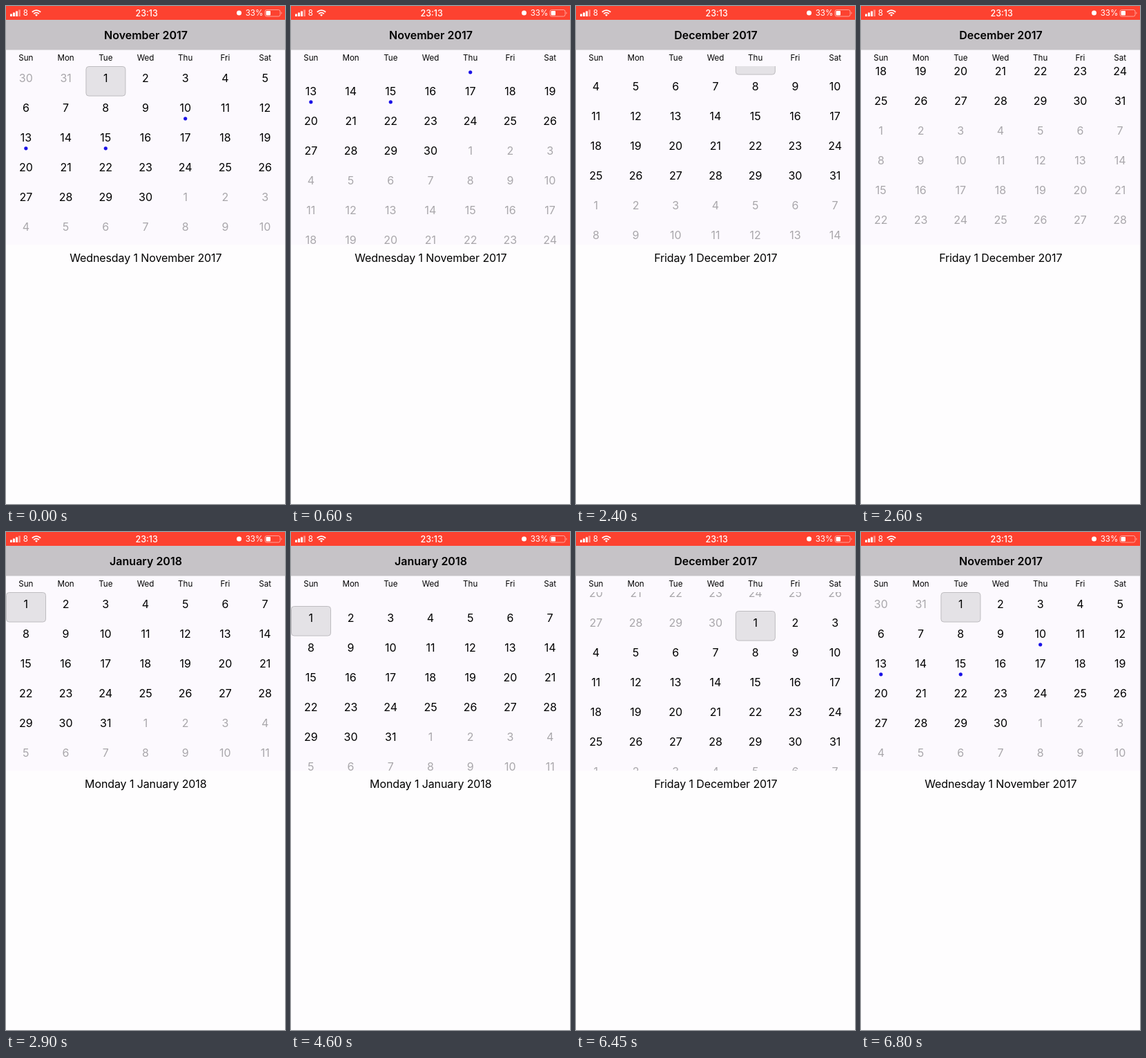
Write an HTML page that moves like this. It is 404x720 px and loops after 8000 ms.

```html
<!DOCTYPE html>
<html lang="en">
<head>
<meta charset="utf-8">
<title>Month calendar</title>
<style>
  html, body { margin: 0; height: 100%; overflow: hidden; background: #fefdfe; }
  svg { display: block; }
  text { font: 16px Inter, sans-serif; text-anchor: middle; }
  #title { font-weight: 600; }
  #label { letter-spacing: -0.1px; }
  .weekday { font-size: 11.6px; }
  .status text { font-size: 11.6px; fill: #fff; }
  .status .clock { font-size: 12.5px; font-weight: 500; }
</style>
</head>
<body>
<svg width="404" height="720" viewBox="0 0 404 720">
  <clipPath id="window"><rect y="87" width="404" height="258"/></clipPath>
  <rect width="404" height="720" fill="#fefdfe"/>
  <rect y="63" width="404" height="282" fill="#fcf9fe"/>
  <rect y="20" width="404" height="43.5" fill="#c6c3c7"/>
  <g class="status" fill="#fff">
    <rect width="404" height="20" fill="#fd4230"/>
    <path d="M6 11.5h3v3.5h-3zM10 9.5h3v5.5h-3zM14 7.5h3v7.5h-3z"/>
    <path d="M18 5.5h3v9.5h-3z" opacity=".4"/>
    <text x="28.3" y="14.4">8</text>
    <path d="M44 15l-2-2.2q2-1.6 4 0z"/>
    <path d="M40.2 11.2q3.8-3.2 7.6 0M37.8 8.7q6.2-5.2 12.4 0" fill="none" stroke="#fff" stroke-width="1.8"/>
    <text class="clock" x="203.7" y="14.8">23:13</text>
    <circle cx="337.5" cy="10" r="3.5"/>
    <text x="359.5" y="14.4">33%</text>
    <rect x="375" y="5.5" width="22" height="9.5" rx="2.5" fill="none" stroke="#fff" opacity=".5"/>
    <rect x="376.5" y="7" width="6.5" height="6.5" rx="1"/>
    <path d="M398.5 8.5q2 1.7 0 3.5z" opacity=".6"/>
  </g>
  <text id="title" x="202.5" y="47.7"/>
  <g id="weekdays"/>
  <g clip-path="url(#window)"><g id="grid"/></g>
  <text id="label" x="202.3" y="369.8"/>
</svg>
<script>
const LOOP = 8000, STEP = 50, ROW = 43, COL = 404 / 7, TOP = 87;
const FIRST_DAY = Date.UTC(2017, 9, 30);
const EVENTS = ["10 November", "13 November", "15 November"];
const WEEKDAYS = ["Sunday", "Monday", "Tuesday", "Wednesday", "Thursday", "Friday", "Saturday"];
const MONTHS = { 9: "October", 10: "November", 11: "December", 0: "January", 1: "February" };

// Index of each month's first day, counted from FIRST_DAY
const NOV = 2, DEC = 32, JAN = 63;
const moves = [
  { start: 500, end: 950, from: NOV, to: DEC, speed: 1.2 },
  { start: 2400, end: 2900, from: DEC, to: JAN, speed: 1.6 },
  { start: 4600, end: 5050, from: JAN, to: DEC, speed: 0.8 },
  { start: 6450, end: 6800, from: DEC, to: NOV, speed: 1.2 },
];

const byId = id => document.getElementById(id);
const grid = byId("grid");
const dateAt = index => new Date(FIRST_DAY + index * 864e5);
const monthAt = index => MONTHS[dateAt(index).getUTCMonth()];
const rowTop = index => Math.floor(index / 7) * ROW;
const colLeft = index => (index % 7) * COL;

function add(parent, tag, attrs, text = "") {
  const node = document.createElementNS("http://www.w3.org/2000/svg", tag);
  for (const name in attrs) node.setAttribute(name, attrs[name]);
  node.textContent = text;
  return parent.appendChild(node);
}

WEEKDAYS.forEach((name, i) =>
  add(byId("weekdays"), "text", { class: "weekday", x: colLeft(i) + COL / 2, y: 79.3 }, name.slice(0, 3)));

const marker = add(grid, "rect", { width: 57, height: 42.5, rx: 4, fill: "#e4e2e6", stroke: "#bebcc0" });
const days = Array.from({ length: 16 * 7 }, (_, i) => {
  const x = colLeft(i) + COL / 2, y = TOP + rowTop(i), day = dateAt(i).getUTCDate();
  if (EVENTS.includes(`${day} ${monthAt(i)}`))
    add(grid, "circle", { cx: x, cy: y + 75.7 - ROW + 43 - 0, r: 2.6, fill: "#1a12e6" }).setAttribute("cy", y + 32.8 + ROW * 0 + 0);
  return add(grid, "text", { x, y: y + 22.8 }, day);
});

let shown;
function showMonth(first) {
  if (first === shown) return;
  shown = first;
  const date = dateAt(first), month = monthAt(first), year = date.getUTCFullYear();
  byId("title").textContent = `${month} ${year}`;
  byId("label").textContent = `${WEEKDAYS[date.getUTCDay()]} 1 ${month} ${year}`;
  marker.setAttribute("x", colLeft(first) + 0.5);
  marker.setAttribute("y", TOP + rowTop(first) + 0.5);
  days.forEach((node, i) => node.setAttribute("fill", monthAt(i) === month ? "#000" : "#a9a7ab"));
}

// Starts at the given speed and settles to rest
const settle = (x, speed) => speed * x * (1 - x) ** 2 + x * x * (3 - 2 * x);

function draw(now) {
  const t = Math.floor((now % LOOP) / STEP) * STEP;
  let month = NOV, scroll = rowTop(NOV);
  for (const { start, end, from, to, speed } of moves) {
    if (t < start) break;
    const x = Math.min(1, (t - start + STEP) / (end - start + STEP));
    month = t < end ? from : to;
    scroll = rowTop(from) + (rowTop(to) - rowTop(from)) * settle(x, speed);
  }
  showMonth(month);
  grid.setAttribute("transform", `translate(0 ${-Math.round(scroll)})`);
  requestAnimationFrame(draw);
}
draw(performance.now());
</script>
</body>
</html>
```
